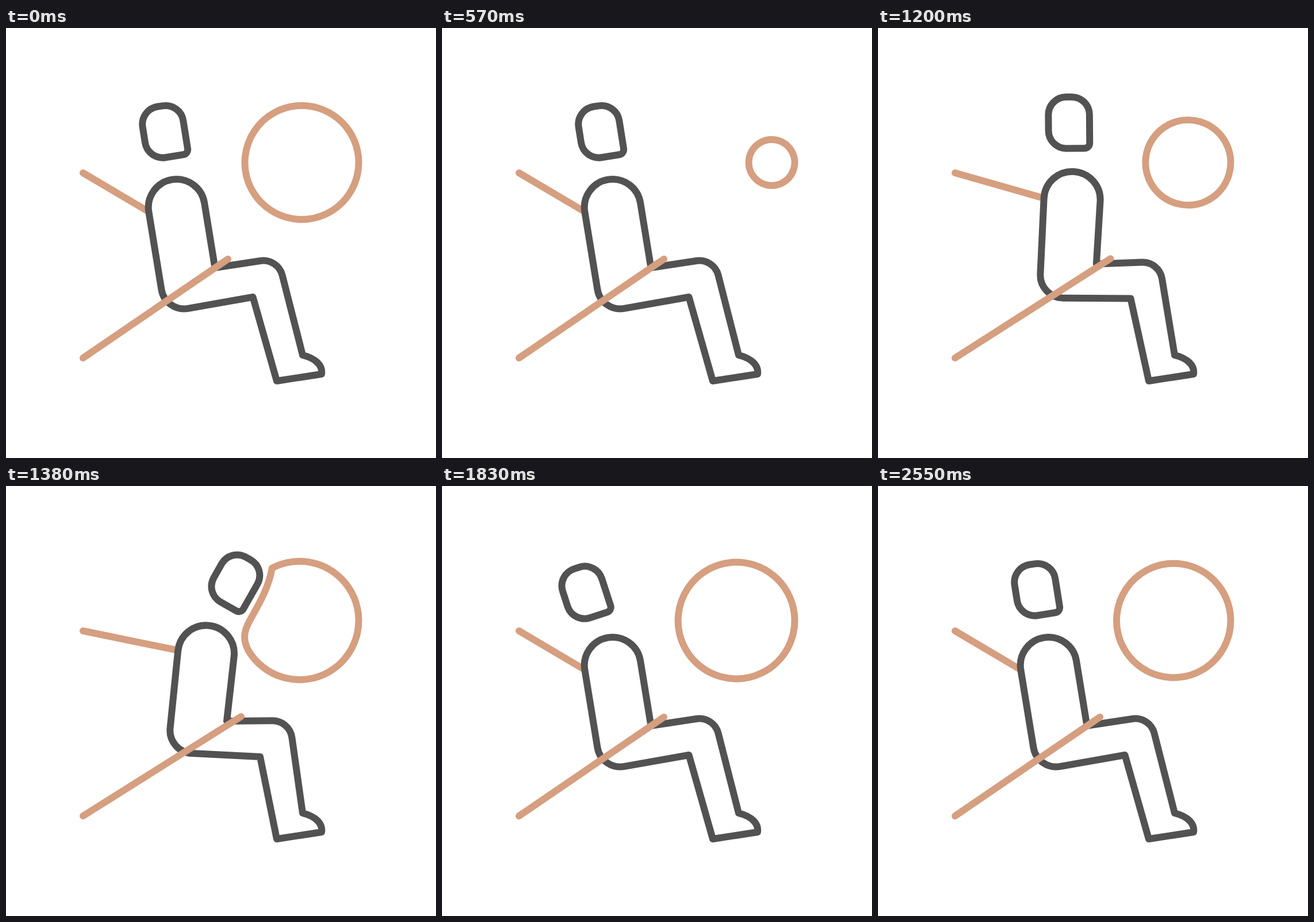
An HTML page for the animation above (2580 ms loop, 748 by 748 pixels).

```html
<!DOCTYPE html>
<html lang="en">
<head>
<meta charset="utf-8">
<title>Seat belt and airbag</title>
<style>
html, body { margin: 0; width: 100%; height: 100%; overflow: hidden; background: #fff; }
svg { display: block; width: 100%; height: 100%; }
path { fill: none; stroke-width: 12; stroke-linecap: round; stroke-linejoin: round; }
.dark { stroke: #525252; }
.tan { stroke: #d59f80; }
</style>
</head>
<body>
<svg viewBox="0 0 748 748">
  <path id="strap" class="tan"/>
  <path id="bag" class="tan"/>
  <path id="body" class="dark"/>
  <path id="head" class="dark"/>
  <path id="lap" class="tan"/>
</svg>
<script>
const LOOP = 2580, STEP = 30, CRASH = 1080;
const rad = d => d * Math.PI / 180;
const mix = (a, b, k) => a + (b - a) * k;
const mixPt = (a, b, k) => [mix(a[0], b[0], k), mix(a[1], b[1], k)];
const pt = p => p[0].toFixed(2) + ' ' + p[1].toFixed(2);
const set = (id, d) => document.getElementById(id).setAttribute('d', d);

// Progress 0..1 between two times, eased at both ends
function ease(t, from, to) {
  const k = Math.min(1, Math.max(0, (t - from) / (to - from)));
  return k < 0.5 ? 2 * k * k : 1 - 2 * (1 - k) ** 2;
}

// Line to corner b, rounded with radius r, on the way from a to c
function rounded(a, b, c, r) {
  const unit = p => {
    const l = Math.hypot(p[0] - b[0], p[1] - b[1]);
    return [(p[0] - b[0]) / l, (p[1] - b[1]) / l];
  };
  const u = unit(a), v = unit(c);
  const d = r / Math.tan(Math.acos(u[0] * v[0] + u[1] * v[1]) / 2);
  const sweep = u[0] * v[1] < u[1] * v[0] ? 1 : 0;
  const along = w => pt([b[0] + w[0] * d, b[1] + w[1] * d]);
  return `L${along(u)}A${r} ${r} 0 0 ${sweep} ${along(v)}`;
}

// Draws torso, legs and belts; returns the torso centre
function drawBody(t) {
  const lean = ease(t, 1050, 1270) - ease(t, 1400, 1700);
  const r = 49, tilt = rad(-9 + 15 * lean);
  const x = 296.7 + 51.3 * lean, y = 312 - 21 * lean * lean;
  const dx = r * Math.cos(tilt), dy = r * Math.sin(tilt);
  const left = [x - dx, y - dy], right = [x + dx, y + dy];
  const hip = mixPt([363.5, 417], [384, 409], lean);
  const seat = mixPt([277, 495], [281.3, 463], lean);
  const back = mixPt([429.5, 468], [442, 471], lean);
  const knee = mixPt([473, 400.4], [493.2, 408], lean);
  const ankle = [516, 569];

  set('body', `M${pt(hip)}L${pt(right)}A${r} ${r} 0 0 0 ${pt(left)}` +
    rounded(left, seat, back, 40) +
    `L${pt(back)}L471 614L549 602C551 588 540 575 ${pt(ankle)}` +
    rounded(ankle, knee, hip, 34) + 'Z');
  set('strap', `M134 252L${pt(left)}`);
  set('lap', `M134 574L${pt(mixPt([386, 402], [409, 401], lean))}`);
  return [x, y];
}

// The head is thrown forward, whips back, then settles
function drawHead([x, y], t) {
  const fwd = ease(t, 1110, 1380), whip = ease(t, 1380, 1660), rest = ease(t, 1660, 2400);
  const neck = rad(-9.3 + 31.5 * fwd - 44.5 * whip + 13 * rest);
  const nod = rad(-9 + 38.5 * fwd - 48.5 * whip + 10 * rest);
  const reach = 133.5 + 2.5 * (fwd - rest);
  const cx = x + reach * Math.sin(neck), cy = y - reach * Math.cos(neck);
  const c = Math.cos(nod), s = Math.sin(nod), w = 35.75, h = 44.75;
  const q = [[-w, -h], [w, -h], [w, h], [-w, h]]
    .map(([px, py]) => [cx + px * c - py * s, cy + px * s + py * c]);
  const d = q.map((p, i) => rounded(q[(i + 3) % 4], p, q[(i + 1) % 4], i === 2 ? 9 : 31)).join('');
  set('head', 'M' + d.slice(1) + 'Z');
}

// Slow deflation, fast inflation, then a damped rebound
function bagRadius(t) {
  if (t < CRASH) return mix(33, 99, (1 - t / CRASH) ** 3);
  const s = Math.max(0, t - 1500) / 1000;
  return 33 + 70 * ease(t, CRASH, 1300) - 4 * ease(t, 1380, 1740)
    - 10.7 * Math.exp(-s / 0.28) * Math.sin(2 * Math.PI * s / 0.38);
}

// Control points of the side pressed in by the head, for a unit bag
const PRESSED = [[-0.94, 0.35], [-0.95, 0.22], [-0.87, 0.06], [-0.78, -0.13], [-0.53, -0.48]];

function drawBag(t) {
  const r = bagRadius(t), dent = ease(t, 1240, 1380) - ease(t, 1400, 1560);
  const low = 150.5, mid = 185, top = 242.4;
  const on = deg => [Math.cos(rad(deg)), Math.sin(rad(deg))];
  const handle = (deg, span) => {
    const [x, y] = on(deg), m = 4 / 3 * Math.tan(rad(span) / 4);
    return [x - y * m, y + x * m];
  };
  const round = [handle(low, mid - low), handle(mid, low - mid), on(mid),
                 handle(mid, top - mid), handle(top, mid - top)];
  const place = ([x, y]) => pt([613.5 - r + x * r, 234 + y * r]);
  const side = round.map((p, i) => place(mixPt(p, PRESSED[i], dent)));
  const start = place(on(top));
  set('bag', `M${start}A${r} ${r} 0 1 1 ${place(on(low))}` +
    `C${side.slice(0, 3).join(' ')}C${side.slice(3).join(' ')} ${start}Z`);
}

function draw(t) {
  drawHead(drawBody(t), t);
  drawBag(t);
}

let begin = null;
function tick(now) {
  if (begin === null) begin = now;
  draw(Math.floor((now - begin) % LOOP / STEP) * STEP);
  requestAnimationFrame(tick);
}
draw(0);
requestAnimationFrame(tick);
</script>
</body>
</html>
```
